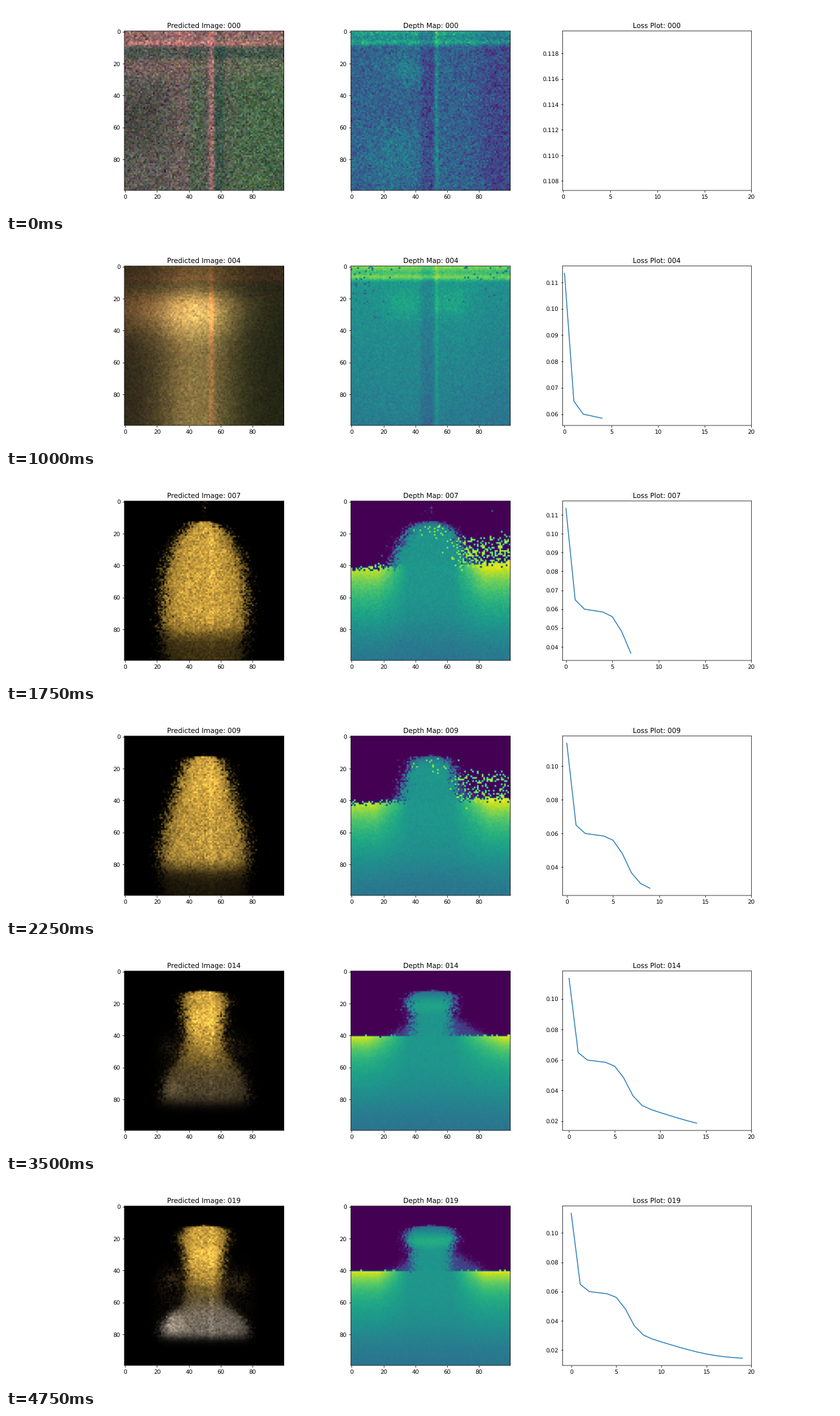
A matplotlib script for the animation above (5 s loop, 1280x320 px).

```python
import numpy as np
import matplotlib.pyplot as plt
from matplotlib.animation import FuncAnimation

plt.rcParams.update({'text.hinting': 'none', 'path.snap': False})

N = 100
FRAMES = 20
v, u = np.mgrid[0:N, 0:N].astype(float)
side = np.abs(u - 49.5)


def sigmoid(x):
    return 1 / (1 + np.exp(-np.clip(x, -40, 40)))


def bump(x, c, w):
    return np.exp(-((x - c) / w) ** 2)


def band(x, a, b, s=.5):
    return sigmoid((x - a) / s) * sigmoid((b - x) / s)


def ease(t, a, b):
    x = np.clip((t - a) / (b - a), 0, 1)
    return x * x * (3 - 2 * x)


def lerp(a, b, w):
    return a + (b - a) * w


def blend(a, b, w):
    """Mix two colours by a field of weights."""
    return lerp(np.array(a, float), np.array(b, float), np.asarray(w)[..., None])


def tone(field, colour):
    return np.multiply.outer(field, colour)


stripe = band(u, 52.5, 55.5, .4)
seam = band(u, 52.5, 54, .3)
gap = band(u, 43.5, 51.5)
top = band(v, -9, 9)


def loss(t):
    return (.0138 + .0195 * np.exp(-(t / 12.5) ** 3)
            + .0262 * sigmoid((6.35 - t) / .58) + .054 * np.exp(-2.3 * t))


def early_view(t):
    """Grey bands turn ochre, then dim to a glow in the dark."""
    warm, dim = ease(t, 0, 2), ease(t, 2, 5)
    green = sigmoid((u - 64) / 5) + .7 * bump(u, 45, 4) * (1 - warm)
    green = green * sigmoid((v - 16) / 5) * (1 - stripe)
    rows = .35 * top + .35 * band(v, 6.5, 8.5) - .12 * band(v, 10, 17) + .15 * bump(v, 23, 6)
    cols = .42 * stripe + .1 * bump(u, 34, 6) - .2 * band(u, 56, 62) * (1 - warm)
    grey = blend((92, 89, 84), (72, 102, 72), green)
    ochre = blend((122, 96, 40), (78, 86, 22), green)
    flush = 1 + tone((rows + cols) * lerp(1, .5, warm), (1.6, .5, .6))
    swell = 1 + .5 * warm * bump(u, 43, 20) - .22 * (1 - warm) * bump(v, 55, 18) * bump(u, 8, 20)
    bands = lerp(grey, ochre, warm) * flush * swell[..., None]

    shine = bump(u, 45, 25) * (.52 + .48 * bump(v, 30, 14)) * lerp(.4, 1, sigmoid((v - 17) / 2.5))
    spread = bump(v, 27, 16) * bump(u, 12, 45)
    dusk = 20 + tone(shine, (200, 170, 92)) + tone(spread, (68, 42, 22))
    dusk *= 1 + tone(.25 * stripe, (1.4, .6, .4))
    return lerp(bands, dusk, dim)


def late_view(t):
    """A golden egg turns into a tower on a stone-coloured foot."""
    p = ease(t, 7, 19)
    gold = np.array((202, 160, 62))
    foot = lerp(gold, np.array((124, 115, 104)), p) * (1 - .5 * bump(t, 14, 3))
    light = (1 + .18 * bump(v, 30, 7) * ease(t, 7, 11) - .4 * p * bump(v, 55, 10)
             + .65 * p * bump(u, 29, 7) * bump(v, 74, 6) + .13 * stripe)
    rest = .3 * (1 - ease(t, 7, 11))
    light *= lerp(rest, 1, sigmoid((82 - v) / lerp(3, 1.5, p)))
    return blend(gold, foot, sigmoid((v - 58) / 4)) * light[..., None]


def half_width(t):
    p = ease(t, 7, 19)
    reach = np.where(v < 62, 50, 95)
    egg = 27 * np.sqrt(np.clip(1 - ((v - 62) / reach) ** 2, 0, 1)) - 5 * (v < 13)
    tower = (12.5 + 3 * p * bump(v, 20, 5) + 15.5 * sigmoid((v - 48 - 18 * p) / (7 - 4 * p))
             - 24 * sigmoid((12 - v) / .5))
    return lerp(egg, tower, ease(t, 7, 11)) + 90 * (1 - ease(t, 4, 7))


def early_depth(t):
    lift = ease(t, 2, 5)
    spots = bump(u, 33, 11) * bump(v, 24, 9) + ease(t, 0, 2) * bump(u, 62, 11) * bump(v, 23, 9)
    bands = (.16 * top + .1 * band(v, -9, 2.5) + .15 * band(v, 5.5, 7.5)
             - .1 * gap * lerp(1, .6, lift) + .2 * seam * lerp(1, .4, lift))
    lower = .08 * bump(u, 28, 20) * bump(v, 80, 20) * (1 - lift)
    right = -.1 * sigmoid((u - 80) / 4) * (1 - lift)
    return (.31 + .04 * ease(t, 0, 2) + bands + lower + right
            + .12 * spots * (1 - .4 * lift) + lift * (.25 - .17 * v / N))


def late_depth(t):
    below = np.maximum(v - 40, 0)
    shrink = bump(t, 13, 4)
    span = 18 + shrink * np.where(u < 50, 8, 14)
    rise = np.clip((side - 14) / span, 0, 1)
    reach = 12 + 6 * bump(t, 7, 3)
    return .53 - .17 * sigmoid((v - 82) / 9) + .45 * rise * np.exp(-below / reach)


def render(t):
    rng = np.random.default_rng(100 + t)
    noise = lambda *shape: rng.standard_normal(shape or (N, N))
    p, late = ease(t, 7, 19), ease(t, 5, 7)
    width, edge = half_width(t), 2.6 - 1.1 * p

    def cover():
        return sigmoid((width - side + edge * noise()) / 1.2)

    # rendered view
    body = cover()
    inside = np.clip(side / np.maximum(width, 1), 0, 1)
    grain = .08 + .11 * np.exp(-t / 2) + .06 * late
    light = body * (1 - .35 * late * inside ** 3) * (1 + grain * noise())
    view = lerp(early_view(t), late_view(t), late) * light[..., None]
    halo = p * (.7 * bump(v, 47, 6) * bump(side, 20, 7) + .3 * bump(side, 20, 10) * bump(v, 58, 20))
    view += tone(halo * (1 - body) * rng.random((N, N)), (80, 62, 36))
    view += (2 + 7 * np.exp(-t / 2)) * noise(N, N, 3) * np.clip(view / 40, 0, 1)

    # depth map
    q = 1 - ease(t, 7, 15)
    ground = lerp(early_depth(t), late_depth(t), late)
    solid = .52 + .1 * p * bump(v, 22, 4) - .15 * bump(v, 12, 4)
    hill = .2 * ease(t, 6, 11) * sigmoid((1.7 * (v - 23) - np.abs(u - 54) + 2 * noise()) / 2)
    sky = lerp(hill, lerp(ground, solid, late), cover())
    horizon = lerp(-20, 40.3 - q * (u - 50) / 25, late) + (.3 + 1.2 * q) * noise()
    depth = np.where(v < horizon, sky, ground)
    depth += (.008 + .065 * np.exp(-t / 3.5)) * noise() * (depth > .1)

    # stray samples: too far, then too near
    hot = late * (.36 * q ** 2 * band(u, 66, 70 + 35 * q, 2) * band(v, 23, 41, 1)
                  + .25 * q * bump(u, 51, 8) * bump(v, 18, 3))
    ends = bump(u, 8, 20) + .8 * bump(u, 92, 20)
    cold = bump(t, 5, .9) * (.4 * band(v, .5, 5.5, .6) * ends
                             + .45 * bump(u, 7, 4) * band(v, 5, 18, 3)
                             + .07 * sigmoid((32 - v) / 5) * ends)
    depth = np.where(rng.random((N, N)) < hot, .93, depth)
    depth = np.where(rng.random((N, N)) < cold, .32 + .03 * noise(), depth)
    return np.clip(view / 255, 0, 1), np.clip(depth, 0, 1)


fig, axes = plt.subplots(1, 3, figsize=(20, 5), dpi=64)
# nudge a third of a pixel right and down, so the thin frames fall on the pixel grid
dx, dy = .3 / 1280, .3 / 320
fig.subplots_adjust(left=.125 + dx, right=.9 + dx, bottom=.11 - dy, top=.88 - dy)


def draw(i):
    view, depth = render(i)
    for ax, name in zip(axes, ('Predicted Image', 'Depth Map', 'Loss Plot')):
        ax.cla()
        ax.set_title(f'{name}: {i:03d}')
    axes[0].imshow(view)
    axes[1].imshow(depth, vmin=0, vmax=1)
    axes[2].plot(loss(np.arange(i + 1)))
    axes[2].set_xticks(np.arange(0, 21, 5))


anim = FuncAnimation(fig, draw, frames=FRAMES, interval=250, init_func=lambda: None,
                     repeat=True, repeat_delay=0)
plt.show()
```
